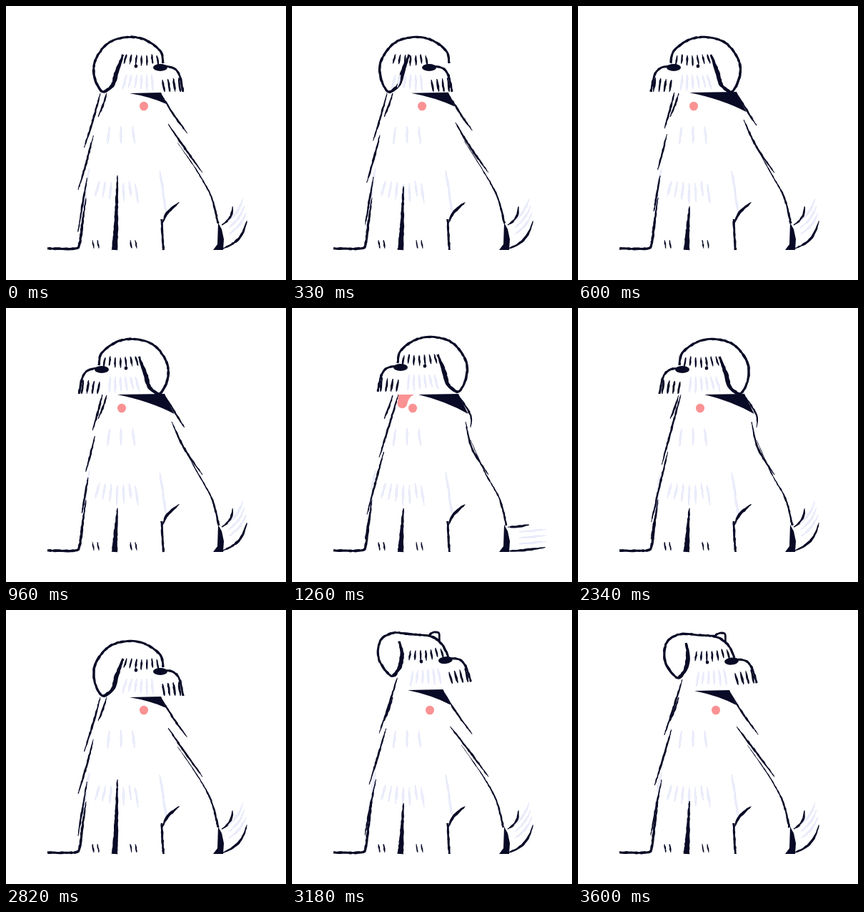
These frames come from a looping animation (392x383 px, 3660 ms). An HTML page with a canvas:

```html
<!DOCTYPE html>
<html lang="en">
<head>
<meta charset="utf-8">
<title>Shaggy dog</title>
<style>
  html, body { margin: 0; width: 100%; height: 100%; overflow: hidden; background: #fff; }
  canvas { display: block; width: 392px; height: 383px; }
</style>
</head>
<body>
<canvas id="stage"></canvas>
<script>
const W = 392, H = 383, LOOP = 3660, STEP = 60;
const INK = '#080a26', PALE = '#dcdff7', PINK = '#fa9293';
const canvas = document.getElementById('stage');
const ctx = canvas.getContext('2d');
const scale = window.devicePixelRatio || 1;
canvas.width = W * scale;
canvas.height = H * scale;

// Poses: turn 1 faces right, l and r are the shoulders, flare is how far the coat sticks out
const right = { turn: 1, dx: 0, dy: 0, perk: 0, l: 132, r: 217, y: 122, flare: 11,
  gap: 59, len: 76, scarf: 173, drop: 15, tag: 193, leg: 237 };
const left = { ...right, turn: -1, l: 135, r: 222, y: 121, flare: 5,
  gap: 58, len: 50, scarf: 156, drop: 27, tag: 162, leg: 280 };
const pant = { ...left, dx: 18, dy: -3, l: 149, r: 233, gap: 80, len: 88, scarf: 177, tag: 169 };
const calm = { ...pant, dx: 12, dy: 0, l: 144, len: 98, tag: 171 };
const alert = { ...right, perk: 1, l: 146, r: 212, y: 113, flare: 9,
  gap: 70, len: 78, scarf: 163, drop: 20, leg: 267 };

const ease = k => k * k * (3 - 2 * k);
const spring = k => 1 + 2.9 * (k - 1) ** 3 + 1.9 * (k - 1) ** 2;
const lerp = (a, b, k) => a + (b - a) * k;
const keys = [
  [180, 480, left, ease], [960, 1140, pant, ease], [2160, 2340, calm, ease],
  [2460, 2760, right, ease], [2940, 3300, alert, spring]
];

function poseAt(t) {
  let pose = right;
  for (const [from, to, next, easing] of keys) {
    if (t <= from) break;
    const k = easing(Math.min(1, (t - from) / (to - from))), last = pose;
    pose = Object.fromEntries(Object.keys(last).map(n => [n, lerp(last[n], next[n], k)]));
  }
  return pose;
}

// Rough ink lines through flat x,y lists
let boil = 0;
const random = n => {
  const s = Math.sin(n * 12.9898) * 43758.5453;
  return s - Math.floor(s);
};
const even = () => 1;
const taper = u => 0.3 + 0.7 * Math.sin(Math.PI * u);
const swell = u => Math.sin(Math.PI * u) ** 0.8;
const grow = u => 0.15 + 0.85 * u;

function curve(p) {
  const n = p.length / 2, out = [];
  const at = (i, c) => p[2 * Math.max(0, Math.min(n - 1, i)) + c];
  for (let i = 0; i < n - 1; i++) {
    const m = Math.max(3, Math.ceil(Math.hypot(at(i + 1, 0) - at(i, 0), at(i + 1, 1) - at(i, 1)) / 3));
    for (let j = 0; j < m + (i === n - 2); j++) {
      const s = j / m;
      out.push([0, 1].map(c => {
        const a = at(i - 1, c), b = at(i, c), d = at(i + 1, c), e = at(i + 2, c);
        return b + 0.5 * s * (d - a + s * (2 * a - 5 * b + 4 * d - e + s * (3 * (b - d) + e - a)));
      }));
    }
  }
  return out;
}

function shape(points, color) {
  ctx.fillStyle = color;
  ctx.beginPath();
  points.forEach(q => ctx.lineTo(q[0], q[1]));
  ctx.fill();
}

function ink(p, width, profile = taper, color = INK) {
  const c = curve(p), n = c.length - 1, edge = [[], []];
  c.forEach(([x, y], i) => {
    const a = c[Math.max(0, i - 1)], b = c[Math.min(n, i + 1)];
    const dx = b[0] - a[0], dy = b[1] - a[1], len = Math.hypot(dx, dy) || 1;
    const r = width / 2 * profile(i / n);
    [1, -1].forEach((s, k) => {
      const rough = random(i * 2 + k + p[0] + boil * 6) - 0.5;
      const q = s * (r + rough * Math.min(0.9, r));
      edge[k].push([x - dy / len * q, y + dx / len * q]);
    });
  });
  shape([...edge[0], ...edge[1].reverse()], color);
}

// Pale hairs have a lighter core
function hair(p) {
  ink(p, 2.8, taper, PALE);
  ink(p, 1, swell, '#f6f7fe');
}

const repeat = (n, draw) => { for (let i = 0; i < n; i++) draw(i, random(i + n)); };

function oval(x, y, rx, ry, color) {
  ctx.fillStyle = color;
  ctx.beginPath();
  ctx.ellipse(x, y, rx, ry, 0, 0, 7);
  ctx.fill();
}

// Five strands share one swing; the inner three are pale
function drawTail(t) {
  const phase = t > 1044 && t < 2340 ? (t - 1260) / 432 * 2 * Math.PI : Math.PI;
  const down = 0.5 + 0.5 * Math.cos(phase);
  const bow = 8 - 7 * down, wave = -6 * Math.sin(phase);
  repeat(5, j => {
    const inner = j > 0 && j < 4;
    const a = lerp(-0.94, -0.1, down) + (j - 2) * 0.05 * (1 - down);
    const cos = Math.cos(a), sin = Math.sin(a);
    const root = inner ? 16 : 0, len = inner ? 38 : j ? 53 : 30;
    const size = inner ? 0.4 : j ? 1 : 0.6;
    const p = [];
    for (let u = 0; u <= 1; u += 0.25) {
      const d = root + len * u;
      const off = size * (bow * Math.sin(Math.PI * u) + wave * Math.sin(2 * Math.PI * u));
      p.push(302 + cos * d - sin * off, 323 + (j - 2) * 8.4 + sin * d + cos * off);
    }
    inner ? hair(p) : ink(p, 3.2);
  });
}

function drawCoat(b) {
  const top = b.y - 16 * b.perk;
  const side = y => 103 + (b.l - 103) * Math.max(0, (334 - y) / (334 - top)) ** 1.25;
  repeat(3, i => {
    const y0 = top + i * b.gap, y1 = Math.min(323, y0 + b.len), ym = (y0 + y1) / 2;
    const out = b.flare * (1 - (i - 0.5) ** 2 * 0.3);
    ink([side(y0), y0, side(ym) - out * 0.4, ym, side(y1) - out, y1], 2.8);
  });
  ink([141, 122, 136, 138, 129, 155], 2.6);

  const f = b.flare, lean = (b.r - 222) * 0.2;
  ink([b.r + 2, b.y + 4, b.r + 17, b.y + 29, 247 + f * 0.6, 158 + f * 1.8], 2.6);
  ink([b.r + 10, 154 + f, 250 + lean, 197, 275, 233], 2.8);
  ink([b.r * 0.6 + 110, 178 + f * 1.2, 268 + lean, 230, 288 + lean, 266, 298 + lean, 304], 3, grow);
}

function drawHairs() {
  repeat(3, (i, r) => hair([145 + i * 16, 166 + r * 5, 142 + i * 19, 189 + r * 8]));
  repeat(7, (i, r) => hair([131 + i * 8.3, 244 + r * 4, 125 + i * 10, 264 + r * 12]));
  repeat(2, i => hair([215 + i * 4, 230 + i * 28, 221 + i * 4, 264 + i * 28]));
  repeat(2, i => hair([117 - i * 4, 227 + i * 27, 111 - i * 4, 254 + i * 32]));
}

function drawLegs(b) {
  ink([112, 268, 107, 303, 103, 332, 96, 339, 58, 339], 3.4, u => Math.min(1, 0.3 + 2 * u));
  ink([156, b.leg, 154, 308, 152, 341], 8.5, grow);
  ink([218, 298, 219, 320, 220.5, 341], 3, even);
  ink([219, 304, 226, 289, 243, 274], 4, swell);
  shape([[290, 341], [296, 333], [297, 303], [302, 312], [305, 326], [304, 341]], INK);
  repeat(4, i => {
    const x = 121 + (i >> 1) * 53 + (i % 2) * 7;
    ink([x, 327, x + 2, 339], 2);
  });
}

function drawScarf(b) {
  ctx.fillStyle = INK;
  ctx.beginPath();
  ctx.moveTo(b.scarf, b.y);
  ctx.lineTo(b.r, b.y - 1);
  ctx.lineTo(b.r + b.drop * 0.5, b.y + b.drop);
  ctx.quadraticCurveTo(lerp(b.scarf, b.r, 0.7), b.y + b.drop * 0.35, b.scarf, b.y);
  ctx.fill();
  oval(b.tag, 140, 6, 6.3, PINK);
}

function drawTongue(t) {
  if (t < 1140 || t >= 2160) return;
  const len = 15 + 5 * Math.cos((t - 1260) / 320 * 2 * Math.PI);
  ctx.fillStyle = PINK;
  ctx.beginPath();
  ctx.moveTo(149, 121);
  ctx.lineTo(171, 121);
  ctx.quadraticCurveTo(163, 124, 161, 121 + len * 0.7);
  ctx.bezierCurveTo(159, 122 + len, 149, 122 + len, 147.5, 121 + len * 0.65);
  ctx.fill();
}

// Brow, crown, ear and back up its inner edge
const relaxed = [220,80, 216,63, 195,47.5, 170,43.5, 143,52, 125,76, 124,100, 135,120, 149,111, 155,92, 164,68];
const raised = [219,67, 211,50, 195,38, 168,35, 142,34, 124,46, 122,72, 139,95, 150,84, 154,64, 151,46];

function drawFace() {
  repeat(6, (i, r) => hair([169 + i * 7, 96, 163 + i * 8.6, 113 + r * 6]));
  repeat(7, (i, r) => ink([169 + i * 7, 67 + r * 2, 165 + i * 8.1, 80 + r * 4], 2.6));
  repeat(4, i => ink([219 + i * 7.6, 103 - i, 222 + i * 7.4, 120], 3));
  ink([222, 84, 235, 87, 243, 97, 248, 120], 3, even);
  oval(182, 84, 2.3, 2.6, INK);
  oval(216, 86, 10, 5, INK);
}

// Drawn facing right; mirrored for left. The face slides to the middle in a turn.
function drawHead(b) {
  ctx.save();
  ctx.translate(b.dx, b.dy);
  if (b.turn < 0) {
    ctx.translate(350, 0);
    ctx.scale(-1, 1);
  }
  const dome = relaxed.map((v, i) => lerp(v, raised[i], b.perk));
  if (b.perk > 0) {
    const y = 43 - 10 * b.perk;
    ink([191, 37, 196, y, 205, y, 206.5, 44], 2.8, even);
  }
  ink(dome, 3.2, even);
  ink(dome.slice(-8), 6, swell);
  ctx.translate(182 - b.perk - 34 * (1 - Math.abs(b.turn)), 84 - 11 * b.perk);
  ctx.rotate(-0.1 * b.perk);
  ctx.translate(-182, -84);
  drawFace();
  ctx.restore();
}

function draw(t) {
  boil = Math.floor(t / 120) % 4;
  ctx.setTransform(scale, 0, 0, scale, 0, 0);
  ctx.fillStyle = '#fff';
  ctx.fillRect(0, 0, W, H);
  const pose = poseAt(t);
  drawTail(t);
  drawHairs();
  drawCoat(pose);
  drawLegs(pose);
  drawTongue(t);
  drawScarf(pose);
  drawHead(pose);
}

const start = performance.now();
function tick() {
  const t = (performance.now() - start) % LOOP;
  draw(Math.floor(t / STEP) * STEP);
  requestAnimationFrame(tick);
}
tick();
</script>
</body>
</html>
```
